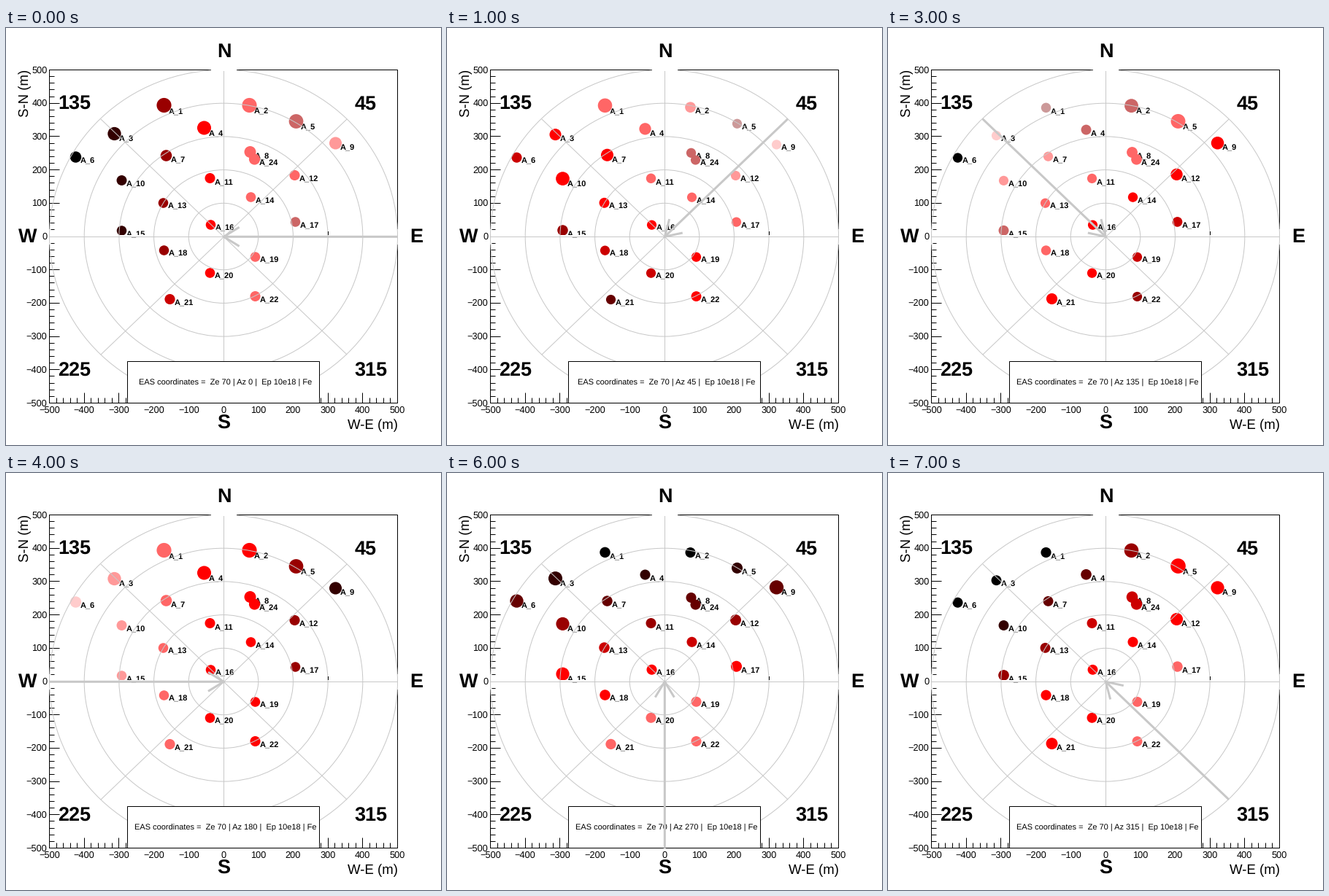
Write a matplotlib script that moves like this. It is 596 px wide and 572 px high and loops after 8000 ms.

```python
import numpy as np
import matplotlib.pyplot as plt
from matplotlib.animation import FuncAnimation
from matplotlib.patches import Circle, Ellipse, Rectangle

W, H, DPI = 596, 572, 100
CX, CY = 298, 286            # plot centre in pixels
SX, SY = 0.477, 0.457        # pixels per metre
L, R, T, B = 59.5, 536.5, 57.5, 514.5
PT = 72 / DPI
GREY = "#c8c8c8"

# surveyed station positions in pixels
STATIONS = {
    1: (216, 106), 2: (333, 106), 3: (148, 145), 4: (271, 137),
    5: (397, 128), 6: (95, 177), 7: (219, 175), 8: (334, 170),
    9: (451, 158), 10: (158, 209), 11: (279, 206), 12: (395, 202),
    13: (215, 240), 14: (335, 232), 15: (158, 278), 16: (280, 270),
    17: (396, 266), 18: (216, 305), 19: (341, 314), 20: (279, 336),
    21: (224, 372), 22: (341, 368), 24: (340, 180),
}

# arrival colours, early to late; anything before the first band wraps to black
COLORS = ["#ffcccc", "#cc9999", "#ff9999", "#cc6666", "#ff6666", "#ff0000",
          "#cc0000", "#990000", "#660000", "#330000", "#000000"]
LIMITS = np.r_[np.linspace(469, 205, 5), 60, np.linspace(-100, -354, 5)]

plt.rcParams["font.family"] = "Liberation Sans"
plt.rcParams["text.hinting"] = "none"
fig = plt.figure(figsize=(W / DPI, H / DPI), dpi=DPI, facecolor="white")
ax = fig.add_axes([0, 0, 1, 1])
ax.set_xlim(0, W)
ax.set_ylim(H, 0)
ax.axis("off")


def line(xs, ys, color="black", width=1, z=1, **kw):
    return ax.plot(xs, ys, color=color, lw=width * PT, zorder=z, snap=False,
                   solid_capstyle="butt", **kw)[0]


def text(x, y, s, px, ha="left", z=6, **kw):
    return ax.text(x, y - 0.8, s, fontsize=px * PT, ha=ha, va="baseline",
                   zorder=z, **kw)


def box(x, y, w, h, z, edge="none"):
    ax.add_patch(Rectangle((x, y), w, h, fc="white", ec=edge, snap=False,
                           lw=0 if edge == "none" else PT, zorder=z))


def number(v):
    return str(v).replace("-", "\u2212")


def draw_frame():
    line([L, R, R, L, L], [T, T, B, B, T], solid_joinstyle="miter")
    for i in range(51):
        size = 14 if i % 5 == 0 else 7
        x = np.floor(L + i / 50 * (R - L)) + 0.5
        y = np.floor(B - i / 50 * (B - T)) + 0.5
        line([x, x], [B, B - size])
        line([L, L + size], [y, y])
    for v in range(-500, 501, 100):
        text(CX + v * SX, 528.5, number(v), 12.7, "center")
        text(56.5, CY - v * SY + 4.7, number(v), 12.7, "right")
    text(536.5, 551, "W-E (m)", 18.7, "right")
    text(31, 57.8, "S-N (m)", 18.7, "right", rotation=90,
         rotation_mode="anchor")


def draw_grid():
    box(64, 284, 468, 2, 4)
    for r in range(100, 501, 100):
        ax.add_patch(Ellipse((CX, CY), 2 * r * SX, 2 * r * SY, fc="none",
                             ec=GREY, lw=PT, zorder=5))
    for a in np.radians([0, 45, 90, 135]):
        dx, dy = 500 * SX * np.cos(a), 500 * SY * np.sin(a)
        line([CX + 0.5 - dx, CX + 0.5 + dx],
             [CY + 0.5 + dy, CY + 0.5 - dy], GREY, z=5)
    line([441.5, 441.5], [279, 284], z=5)


def draw_compass():
    box(281, 55, 35, 4, 5.5)
    for x in (L, R):
        box(x - 2, 276, 4, 21, 4.5)
    for x, y, s in [(298.5, 41, "N"), (29.5, 295, "W"),
                    (562, 295, "E"), (298, 551, "S")]:
        text(x, y, s, 27, "center", weight="bold")
    for x, y, s in [(71.5, 112.5, "135"), (477.5, 112.5, "45"),
                    (71.5, 478.5, "225"), (477.5, 478.5, "315")]:
        text(x, y, s, 27, weight="bold")


def radius(p, az):
    """Marker size peaks on a ring around the shower axis."""
    d = abs(p) - 385
    peak = np.exp(-(d / (60 if d > 0 else 130)) ** 2)
    return 6.75 - 0.25 * np.sin(np.radians(az)) + 3.4 * peak


class Station:
    """A marker standing on a fixed base line, with its label."""

    def __init__(self, n, px, py, z):
        self.x, self.y = (px - CX) / SX, (CY - py) / SY
        self.px, self.base = px + 0.5, py + radius(self.y, 0)
        self.dot = ax.add_patch(Circle((px, py), 7, lw=0, zorder=z))
        text(px + 6.5, self.base + 2, f"A_{n}", 11, z=z + 0.02,
             weight="bold")

    def show(self, az, c, s):
        ahead = self.x * c + self.y * s
        r = radius(self.y * c - self.x * s, az)
        level = np.count_nonzero(ahead < LIMITS) - 1
        self.dot.set(center=(self.px, self.base - r), radius=r,
                     facecolor=COLORS[level])


draw_frame()
draw_grid()
draw_compass()
box(166.5, 457.5, 263, 57, 7, "black")
caption = text(301, 490.5, "", 11, "center", z=8)
shaft = line([], [], GREY, 3, 9)
head = line([], [], GREY, 3, 9, solid_joinstyle="miter")
stations = [Station(n, *pos, 2 + 0.05 * k)
            for k, (n, pos) in enumerate(STATIONS.items())]


def update(i):
    az = 45 * i
    c, s = np.cos(np.radians(az)), np.sin(np.radians(az))
    for st in stations:
        st.show(az, c, s)
    tip = np.array([CX + 0.3, CY + 0.3])
    ray = 500 * np.array([SX * c, -SY * s])
    shaft.set_data(*zip(tip, tip + ray))
    arms = np.arctan2(ray[1], ray[0]) + np.radians([-31.5, 31.5])
    ends = tip[:, None] + 25 * np.array([np.cos(arms), np.sin(arms)])
    head.set_data(*np.insert(ends, 1, tip, axis=1))
    caption.set_text(
        f"EAS coordinates =  Ze 70 | Az {az} |  Ep 10e18 | Fe")
    return [st.dot for st in stations] + [shaft, head, caption]


anim = FuncAnimation(fig, update, frames=8, interval=1000, repeat=True,
                     repeat_delay=0, blit=False)
plt.show()
```
